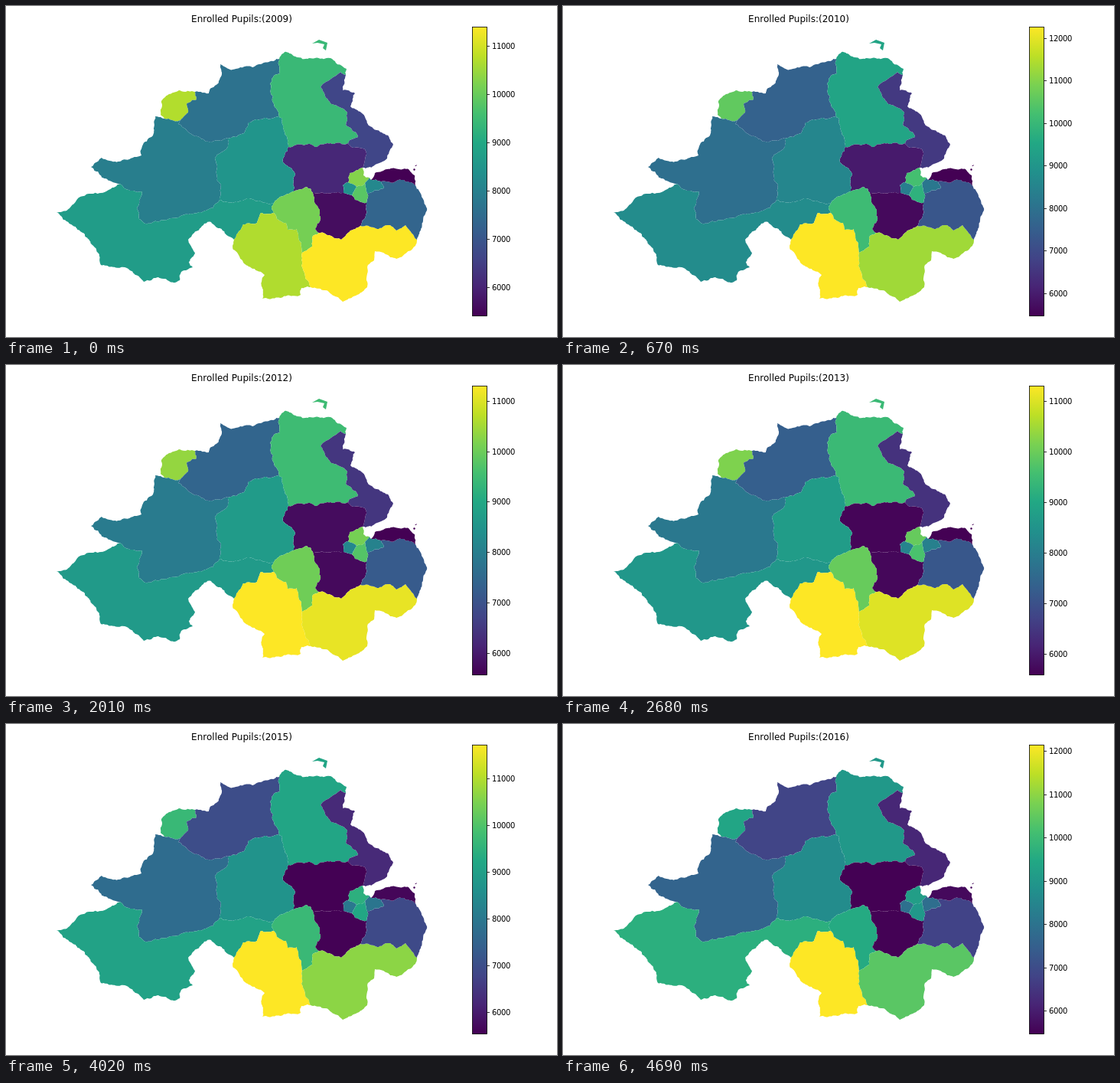
These frames come from a looping animation (720x432 px, 7370 ms). An HTML page:

```html
<!DOCTYPE html>
<html lang="en">
<head>
<meta charset="utf-8">
<title>Enrolled Pupils</title>
<style>
  html, body { margin: 0; width: 100%; height: 100%; overflow: hidden; background: #fff; }
  svg { display: block; width: 720px; height: 432px; font: 10px "DejaVu Sans", sans-serif; }
  #title { font-size: 12px; text-anchor: middle; }
  #ticks { letter-spacing: -.36px; }
</style>
</head>
<body>
<svg viewBox="0 0 720 432">
  <defs><linearGradient id="scale" x1="0" y1="1" x2="0" y2="0"></linearGradient></defs>
  <text id="title" x="308" y="21"></text>
  <g id="map"></g>
  <rect x="609.5" y="27.5" width="19" height="377" fill="url(#scale)" stroke="#000" stroke-width=".8"/>
  <g id="ticks"></g>
</svg>
<script>
const $ = id => document.getElementById(id);
const parse = (s = '') => s.split(' ').filter(Boolean).map(p => p.split(',').map(Number));

// Points where regions meet each other or the coast
const nodes = {
  A: '207,147', B: '228,149', C: '247,112', D: '357,69', E: '357,144', F: '290,173',
  G: '369,184', H: '447,179', I: '444,90', J: '466,211', K: '149,232', L: '279,253',
  M: '350,257', N: '350,270', O: '298,305', P: '376,242', Q: '401,244', R: '409,296',
  S: '387,322', T: '398,367', U: '463,287', V: '537,305', W: '441,244', X: '452,247',
  Y: '471,257', Z: '472,244', a: '447,230', b: '458,236', c: '469,231', d: '475,224',
  e: '477,227', f: '490,229', g: '535,234'
};

// Key points between two nodes; pairs not named here join straight
const borders = {
  KA: '128,225 111,210 125,198 148,203 177,195 178,183 192,169 195,144',
  AC: '202,142 203,124 213,115 226,110',
  BC: '238,139 236,128 249,122',
  CD: '265,114 276,102 281,92 280,76 296,83 322,80',
  DE: '358,88 350,91 346,108 349,126',
  EF: '338,146 317,152 311,166',
  BF: '225,154 247,170 262,177',
  FL: '289,185 273,198 276,228 281,233',
  KL: '162,241 178,242 171,264 174,278 182,284 216,277 245,271 270,264',
  LM: '296,257 315,251 333,255',
  EG: '361,147',
  GP: '362,204 378,219',
  MP: '358,249',
  PQ: '393,236',
  GH: '397,180 406,184 420,179',
  DI: '364,60 391,69 424,68 445,82',
  IH: '437,86 411,106 425,128 446,139 444,155 458,166 460,171 449,175',
  IJ: '440,110 456,114 450,131 464,139 480,160 495,167 506,181 498,199 470,212',
  HJ: '455,185 469,187 470,196',
  Ja: '449,218',
  Jd: '467,221',
  aW: '440,234',
  QW: '416,245',
  XY: '456,253',
  fZ: '494,237',
  eg: '482,218 498,213 526,213 534,221',
  fg: '509,229 520,227',
  gV: '550,264 545,280',
  UV: '487,291 502,286 510,293 522,286',
  YU: '470,274',
  RU: '438,305 450,293',
  QR: '403,256 410,266 411,279 404,291',
  RS: '401,300 400,314',
  NS: '356,279 366,283 368,292 380,291 386,310',
  MN: '347,262',
  NO: '333,270 328,283 309,286',
  OK: '268,282 259,284 238,305 247,323 239,334 244,341 229,347 227,358 219,361 199,354 180,360 158,342 124,338 121,323 103,298 66,270 83,264 97,249 124,244',
  OT: '297,318 304,325 311,336 338,351 334,360 335,382 385,377 386,368',
  ST: '386,339 391,353',
  TV: '415,371 440,386 472,367 473,338 481,332 482,320 510,330 535,313'
};

// Ring of nodes, then pupil counts evenly spaced over all years
const regions = [
  ['ACB', 10700, 10330, 9400],
  ['CDEFB', 7660, 7400, 6830],
  ['DIHGE', 9422, 9500, 9030],
  ['IJH', 6660, 6450, 6200],
  ['GHJaWQP', 6071, 5700, 5478],
  ['EGPMLF', 8500, 8720, 8680],
  ['KABFL', 7960, 7930, 7620],
  ['KLMNO', 8704, 8747, 8943, 8668, 8588, 8508, 9095, 9681],
  ['ONST', 10679, 12269, 10744, 11304, 11300, 11294, 11720, 12150],
  ['MPQRSN', 10140, 10030, 9548],
  ['QWXYUR', 5610, 5730, 5490],
  ['RUVTS', 11397, 11170, 10970, 10415],
  ['YZfgVU', 7340, 7200, 6800],
  ['egf', 5413, 5568, 5608, 5640],
  ['Jdcba', 10290, 10070, 9200],
  ['abXW', 8420, 8190, 7930],
  ['bcZYX', 9830, 9740, 9020],
  ['cdefZ', 8200, 8080, 7870]
];
const isles = {
  DIHGE: 'M400,49L409,44L420,48L418,58L414,55L416,50L407,48z',
  egf: 'M534,209l3,-2l-1,2zM532,213l2,-1l1,2l-2,1z'
};

const palette = '440154 482475 414487 355f8d 2a788e 21918c 22a884 44bf70 7ad151 bddf26 fde725'
  .split(' ').map(h => [0, 2, 4].map(i => parseInt(h.substr(i, 2), 16)));

// Even keys read at k from 0 to 1
function lerpKeys(keys, k) {
  const x = k * (keys.length - 1), i = Math.min(keys.length - 2, Math.floor(x));
  return keys[i] + (keys[i + 1] - keys[i]) * (x - i);
}

const color = k =>
  `rgb(${[0, 1, 2].map(c => Math.round(lerpKeys(palette.map(p => p[c]), k)))})`;

const noise = (x, y) => {
  const n = Math.sin(x * 12.9898 + y * 78.233) * 43758.5453;
  return n - Math.floor(n) - 0.5;
};

// Ragged line from a to b, without a; the same in both directions
function ragged(a, b) {
  const len = Math.hypot(b[0] - a[0], b[1] - a[1]);
  if (len < 3) return [b];
  const x = (a[0] + b[0]) / 2, y = (a[1] + b[1]) / 2, amp = Math.min(len, 10) * 0.3;
  const m = [x + noise(x, y) * amp, y + noise(y, x) * amp];
  return [...ragged(a, m), ...ragged(m, b)];
}

function border(p, q) {
  const between = p + q in borders ? parse(borders[p + q]) : parse(borders[q + p]).reverse();
  const pts = [...parse(nodes[p]), ...between, ...parse(nodes[q])];
  return pts.slice(1).flatMap((pt, i) => ragged(pts[i], pt));
}

const shapes = regions.map(([ring]) => {
  const pts = [...ring].flatMap((p, i) => border(p, ring[(i + 1) % ring.length]));
  const path = document.createElementNS('http://www.w3.org/2000/svg', 'path');
  path.setAttribute('d', `M${pts.map(p => p.map(v => v.toFixed(1))).join('L')}z${isles[ring] || ''}`);
  $('map').append(path);
  return path;
});

$('scale').innerHTML = palette.map((c, i) =>
  `<stop offset="${i / 10}" stop-color="rgb(${c})"/>`).join('');

function show(step) {
  const counts = regions.map(([, ...keys]) => lerpKeys(keys, step / 7));
  const low = Math.min(...counts), high = Math.max(...counts);
  const place = n => (n - low) / (high - low);
  $('title').textContent = `Enrolled Pupils:(${2009 + step})`;
  shapes.forEach((s, i) => s.setAttribute('fill', color(place(counts[i]))));
  let ticks = '';
  for (let n = 6000; n <= high; n += 1000) {
    const y = Math.floor(404.2 - place(n) * 377) + 0.5;
    ticks += `<path d="M628.5,${y}h3.5" stroke="#000" stroke-width=".8"/>` +
      `<text x="635" y="${y + 3.5}">${n}</text>`;
  }
  $('ticks').innerHTML = ticks;
}

let shown;
function tick() {
  const step = Math.min(7, Math.floor(performance.now() % 7370 / 670));
  if (step !== shown) show(shown = step);
  requestAnimationFrame(tick);
}
tick();
</script>
</body>
</html>
```
